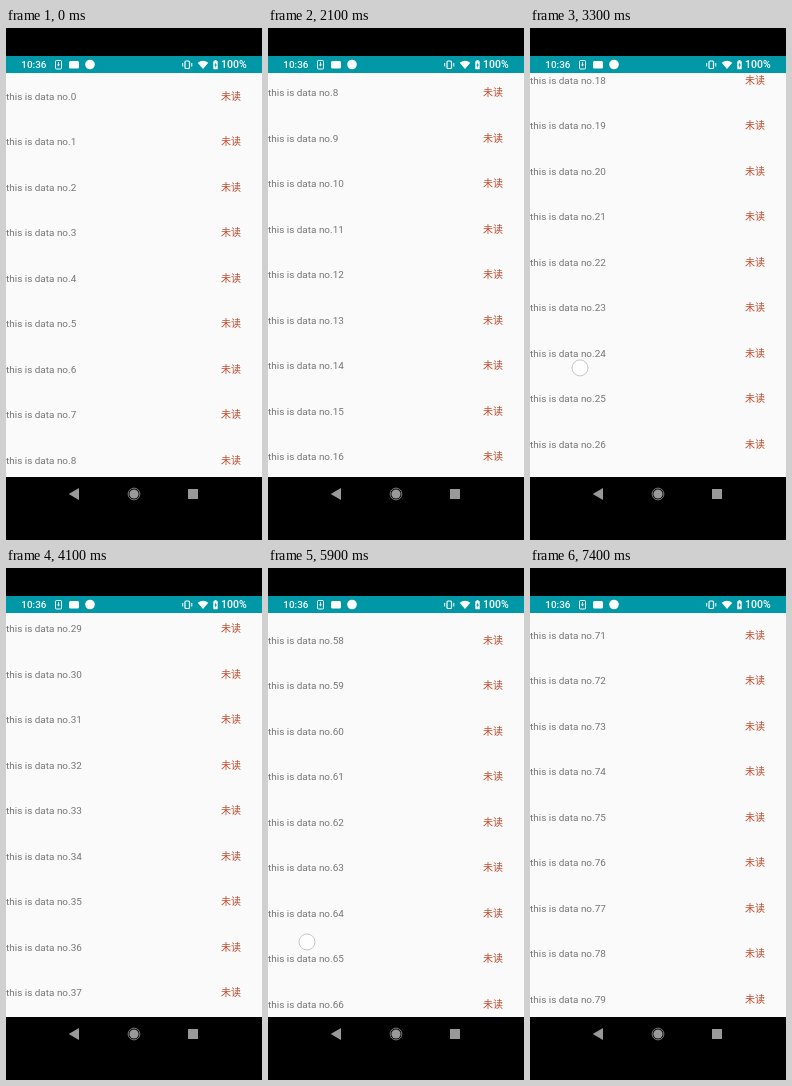
These frames come from a looping animation (256 px wide and 512 px high, 8300 ms). An HTML page:

```html
<!DOCTYPE html>
<html lang="zh-CN">
<head>
<meta charset="utf-8">
<title>List scrolling</title>
<style>
html, body { margin: 0; height: 100%; overflow: hidden; background: #000; }
svg { display: block; width: 100vw; height: 100vh; }
text { font-family: Roboto, "Noto Sans CJK SC", "Noto Sans CJK", sans-serif; }
#rows text { font-size: 9.95px; fill: #757575; }
#rows .unread { font-size: 10px; fill: #bf4a2c; }
.status { fill: #fff; font-weight: 500; }
</style>
</head>
<body>
<svg viewBox="0 0 256 512">
  <clipPath id="list"><rect y="45" width="256" height="404"/></clipPath>
  <rect width="256" height="512"/>
  <rect y="45" width="256" height="404" fill="#fafafa"/>
  <g id="rows" clip-path="url(#list)"></g>
  <circle id="finger" r="8" fill="#fff" fill-opacity=".8" stroke="#c8c8cc"/>

  <!-- status bar -->
  <rect y="28" width="256" height="17" fill="#0097a7"/>
  <g class="status">
    <text x="15.3" y="40.3" font-size="9.9">10:36</text>
    <text x="215" y="40.3" font-size="10.5">100%</text>
    <rect x="49.5" y="32.5" width="6" height="8.5" rx="1" fill="none" stroke="#fff"/>
    <path d="M52.1 34h.8v2.6h1.2l-1.6 2-1.6-2h1.2z"/>
    <rect x="63" y="33" width="10" height="7.5" rx="1.5"/>
    <circle cx="84" cy="36.5" r="4.8"/>
    <rect x="179" y="33" width="4.5" height="7.5" rx="1" fill="none" stroke="#fff" stroke-width="1.2"/>
    <path d="M176.7 35v3.5M185.8 35v3.5" stroke="#fff"/>
    <path d="M191.7 34.7Q197 30.6 202.3 34.7L197 41z"/>
    <path d="M207.3 33.2h1.2v-1.2h2v1.2h1.2v8h-4.4z"/>
    <path d="M209.9 34.2l-1.6 3.2h1v2.6l1.6-3.4h-1z" fill="#0097a7"/>
  </g>

  <!-- navigation bar -->
  <g fill="#999">
    <path d="M62.7 466L73 460v12z"/>
    <circle cx="128" cy="466" r="4.6"/>
    <circle cx="128" cy="466" r="5.9" fill="none" stroke="#999" stroke-width=".8"/>
    <rect x="182" y="461" width="10" height="10"/>
  </g>
</svg>
<script>
const LOOP = 8300, STEP = 100, PITCH = 45.5, TOUCH = 300;
// start and end time, scroll before and after, finger start
const swipes = [
  [1100, 2200, 0, 368.8, 60, 356.5],
  [2200, 3100, 368.8, 768.4, 55, 380],
  [3100, 4425, 768.4, 1360.5, 50, 406.6],
  [4425, 5800, 1360.5, 2619.5, 45, 395],
  [5800, 7400, 2619.5, 3231.5, 39, 389.6]
];
const rows = document.getElementById("rows");
const finger = document.getElementById("finger");

function addText(parent, x, content, className) {
  const el = document.createElementNS("http://www.w3.org/2000/svg", "text");
  el.setAttribute("x", x);
  el.setAttribute("class", className);
  el.textContent = content;
  return parent.appendChild(el);
}

const pool = Array.from({ length: 11 }, () => [
  addText(rows, 0, "", "label"),
  addText(rows, 215, "未读", "unread")
]);

// Slow drag, quick fling, long slowdown
const fling = u => 1 - (1 - u ** 1.715) ** 3;

function draw(now) {
  const t = Math.floor(now % LOOP / STEP) * STEP;
  let scroll = 0, touching = false;
  for (const [start, end, from, to, x, y] of swipes) {
    if (t < start) break;
    scroll = from + (to - from) * fling(Math.min(1, (t - start) / (end - start)));
    touching = t - start <= TOUCH;
    finger.setAttribute("cx", x);
    finger.setAttribute("cy", y - (scroll - from));
  }
  finger.style.display = touching ? "" : "none";

  const first = Math.max(0, Math.floor(scroll / PITCH) - 1);
  pool.forEach(([label, unread], i) => {
    const n = first + i, y = 71.8 + n * PITCH - scroll;
    label.textContent = "this is data no." + n;
    label.setAttribute("y", y);
    unread.setAttribute("y", y);
  });
}

const begin = performance.now();
function tick() {
  draw(performance.now() - begin);
  requestAnimationFrame(tick);
}
tick();
</script>
</body>
</html>
```
